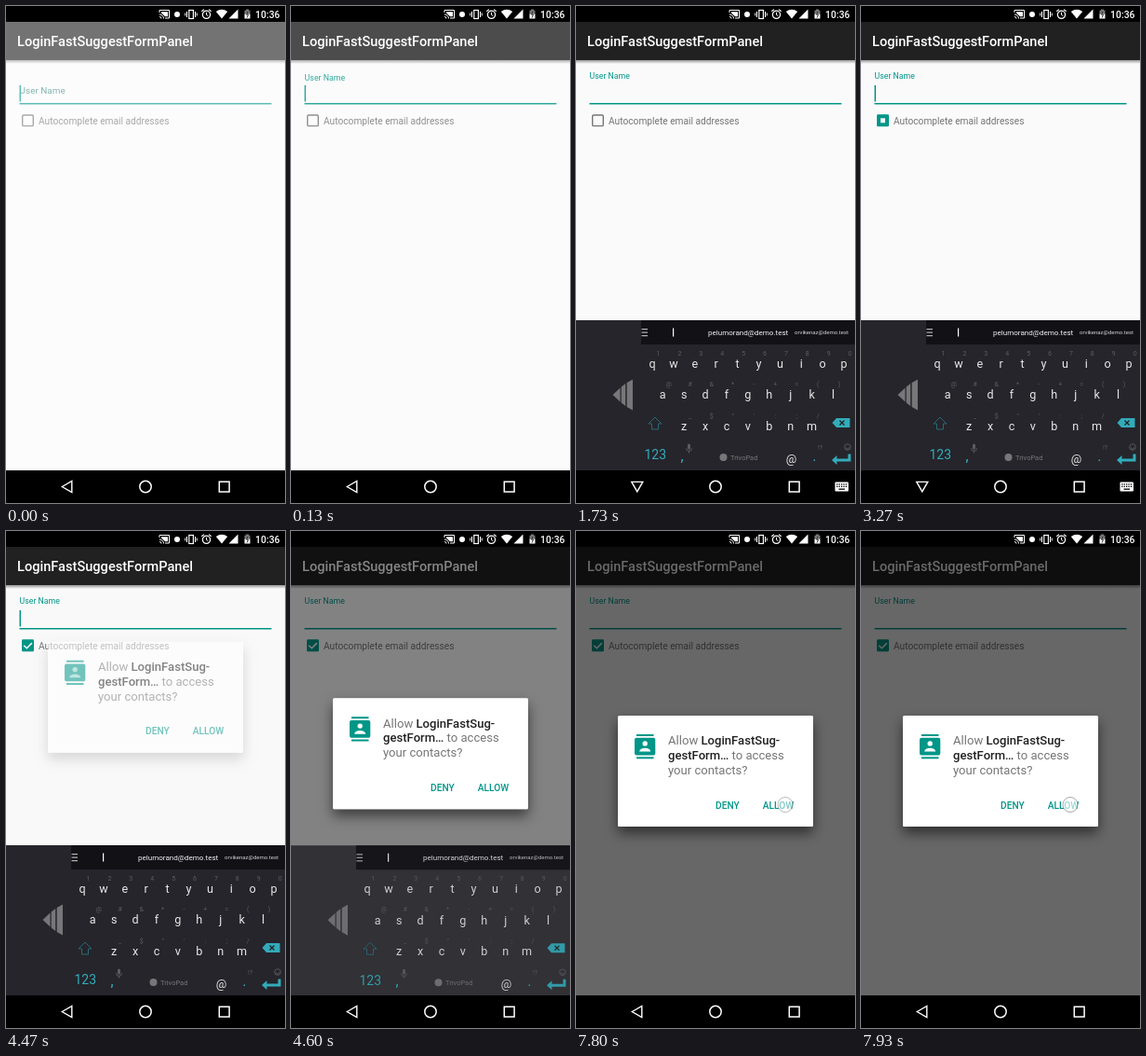
An HTML page with a canvas that plays this animation: 300 px wide and 533 px high, repeating every 8 s.

```html
<!DOCTYPE html>
<html lang="en">
<head>
<meta charset="utf-8">
<style>
html, body { margin: 0; width: 100%; height: 100%; overflow: hidden; background: #000; }
canvas { display: block; width: 300px; height: 533px; }
</style>
</head>
<body>
<canvas id="stage"></canvas>
<script>
const W = 300, H = 533, LOOP = 8000;
const PAPER = '#fafafa', DARK = '#212121', ACCENT = '#009688', WHITE = '#fff', MUTED = '#757575';
const KEY_BG = '#25252b', KEY_INK = '#e8e8ea', KEY_TEAL = '#33abba', KEY_DIM = '#5c5c64';
const APP_NAME = 'LoginFastSuggestFormPanel';

const canvas = document.getElementById('stage');
const ctx = canvas.getContext('2d');
const ratio = window.devicePixelRatio || 1;
canvas.width = W * ratio;
canvas.height = H * ratio;

const clamp = v => Math.min(1, Math.max(0, v));
const span = (t, from, to) => clamp((t - from) / (to - from));
const mix = (a, b, p) => a + (b - a) * p;
const easeOut = p => 1 - (1 - p) ** 3;
const between = (t, from, to) => t >= from && t < to;

function rect(x, y, w, h, color) {
  ctx.fillStyle = color;
  ctx.fillRect(x, y, w, h);
}

function roundRect(x, y, w, h, r, color) {
  ctx.beginPath();
  ctx.roundRect(x, y, w, h, r);
  ctx.fillStyle = color;
  ctx.fill();
}

function text(str, x, y, size, color, weight = 400, align = 'left') {
  ctx.font = `${weight} ${size}px Roboto, sans-serif`;
  ctx.textAlign = align;
  ctx.fillStyle = color;
  ctx.fillText(str, x, y);
  return x + ctx.measureText(str).width;
}

function trace(points, closed) {
  ctx.beginPath();
  points.forEach(([x, y]) => ctx.lineTo(x, y));
  if (closed) ctx.closePath();
}

function poly(points, color) {
  trace(points, true);
  ctx.fillStyle = color;
  ctx.fill();
}

function stroke(color, width) {
  ctx.strokeStyle = color;
  ctx.lineWidth = width;
  ctx.stroke();
}

function line(points, color, width, closed = false) {
  trace(points, closed);
  stroke(color, width);
}

function circle(x, y, r, from = 0, to = Math.PI * 2) {
  ctx.beginPath();
  ctx.arc(x, y, r, from, to);
}

function disc(x, y, r, color) {
  circle(x, y, r);
  ctx.fillStyle = color;
  ctx.fill();
}

// Runs draw with its own opacity and offset.
function layer(alpha, dy, draw) {
  ctx.save();
  ctx.globalAlpha *= alpha;
  ctx.translate(0, dy);
  draw();
  ctx.restore();
}

function drawStatusBar() {
  rect(0, 0, W, 17, '#000');
  line([[165, 7], [165, 4.5], [175.5, 4.5], [175.5, 13], [171, 13]], WHITE, 1);
  for (const r of [2, 4.5]) {
    circle(165, 13.5, r, -Math.PI / 2, 0);
    stroke(WHITE, 1);
  }
  poly([[167, 6.3], [174, 6.3], [174, 11.3], [171, 11.3], [167, 7.5]], WHITE);
  disc(184, 9, 3, WHITE);

  ctx.strokeStyle = WHITE;
  ctx.lineWidth = 1.2;
  ctx.strokeRect(196.8, 4.5, 4.6, 9);
  for (const [x, y, h] of [[194, 6, 6], [192.3, 7.5, 3], [203, 6, 6], [204.7, 7.5, 3]]) rect(x, y, 1, h, WHITE);

  circle(215.5, 9.3, 4.1);
  stroke(WHITE, 1.3);
  line([[215.5, 6.8], [215.5, 9.5], [217.3, 10.6]], WHITE, 1);
  line([[210.3, 5.8], [213, 3.6]], WHITE, 1.2);
  line([[218, 3.6], [220.7, 5.8]], WHITE, 1.2);

  ctx.beginPath();
  ctx.moveTo(232, 13.6);
  ctx.lineTo(225.8, 6);
  ctx.quadraticCurveTo(232, 1.6, 238.2, 6);
  ctx.fillStyle = WHITE;
  ctx.fill();
  poly([[239.5, 13.5], [249.5, 13.5], [249.5, 3.5]], WHITE);

  rect(258, 3.5, 3, 1.5, '#777');
  rect(256.5, 4.7, 6, 3.8, '#777');
  rect(256.5, 8.5, 6, 5, WHITE);
  line([[260, 6], [258.6, 9.3], [260.6, 9.3], [259, 12.5]], '#222', 0.9);
  text('10:36', 294.5, 12.7, 10.4, WHITE, 500, 'right');
}

function drawNavBar(t) {
  rect(0, 498, W, 35, '#000');
  const keyboardOpen = between(t, 1130, 4330);
  line(keyboardOpen
    ? [[59.8, 510.4], [71.8, 510.4], [65.8, 520.8]]
    : [[60.3, 515.5], [70.8, 509.4], [70.8, 521.6]], WHITE, 1.4, true);
  circle(150, 515.5, 6.2);
  stroke(WHITE, 1.5);
  ctx.strokeRect(229.3, 510.2, 10.8, 10.8);
  if (!keyboardOpen) return;
  roundRect(278.5, 510.5, 14.5, 10, 1, WHITE);
  for (let row = 0; row < 2; row++)
    for (let col = 0; col < 5; col++) rect(280.2 + col * 2.4, 512.3 + row * 2.4, 1.3, 1.3, '#000');
  rect(282.5, 517.5, 6.5, 1.3, '#000');
}

function drawCheckbox(t) {
  const fill = span(t, 3170, 3290);
  const mark = span(t, 3300, 3450);
  const ripple = span(t, 2600, 2950) * (1 - span(t, 3100, 3260));
  if (ripple > 0) layer(0.12 * ripple, 0, () => disc(23.5, 123, mix(8, 20, span(t, 2600, 2950)), '#000'));

  if (fill === 0) {
    ctx.beginPath();
    ctx.roundRect(17.7, 117, 11.6, 11.6, 1.2);
    stroke(MUTED, 1.4);
    return;
  }
  roundRect(17, 116.3, 13, 13, 1.3, ACCENT);
  const hole = mix(10, 4, fill) * (1 - span(t, 3290, 3340));
  rect(23.5 - hole / 2, 122.8 - hole / 2, hole, hole, PAPER);
  if (mark > 0) {
    const at = (x, y) => [mix(22.3, x, mark), mix(125.6, y, mark)];
    line([at(19.2, 122.8), [22.3, 125.8], at(27.9, 120.1)], PAPER, 1.5);
  }
}

function caretVisible(t) {
  return t < 530 || between(t, 1070, 1530) || between(t, 2000, 2470) ||
    between(t, 3000, 3470) || between(t, 3870, 4530);
}

function drawForm(t) {
  rect(0, 17, W, 481, PAPER);
  const shade = ctx.createLinearGradient(0, 58, 0, 62);
  shade.addColorStop(0, 'rgba(0,0,0,.4)');
  shade.addColorStop(1, 'rgba(0,0,0,0)');
  rect(0, 58, W, 4, shade);
  rect(0, 17, W, 41, DARK);
  text(APP_NAME, 12, 43.4, 14.6, WHITE, 500);

  const float = easeOut(span(t, 0, 230));
  text('User Name', 14.6, mix(94.6, 78.2, float), mix(9.95, 8.75, float), float < 0.5 ? '#3b8a80' : ACCENT);
  rect(14.5, 104, 271, 1.5, ACCENT);
  if (caretVisible(t)) rect(14.5, 85, 1.5, 17.5, ACCENT);
  drawCheckbox(t);
  text('Autocomplete email addresses', 35, 126.6, 10.2, MUTED);

  layer(0.37 * (1 - span(t, 0, 270)), 0, () => rect(0, 17, W, 481, WHITE));
}

function drawKeyRow(letters, hints, x, y) {
  [...letters].forEach((letter, i) => {
    const cx = x + i * 22.9;
    text(letter, cx, y + 4.3, 12.6, KEY_INK, 400, 'center');
    text(hints[i], cx + 6.5, y - 8.8, 7, KEY_DIM, 400, 'center');
  });
}

function drawKeyboard() {
  rect(0, 337, W, 161, KEY_BG);
  rect(70, 337, 230, 26, '#111116');

  for (const y of [346, 349.5, 353]) rect(70.5, y, 6.5, 1.2, '#b4b4b8');
  rect(104, 345.5, 1.2, 9, WHITE);
  text('pelumorand@demo.test', 142, 352.8, 8.05, '#f2f2f4');
  text('orvikenaz@demo.test', 235, 352, 6, '#d4d4d8');

  const grey = '#77777a';
  poly([[39.5, 417], [47.5, 409.5], [47.5, 424.5]], grey);
  poly([[48.7, 408.5], [53.2, 405], [53.2, 429], [48.7, 425.5]], grey);
  poly([[54.7, 404], [61, 400.5], [61, 433.5], [54.7, 430]], grey);

  drawKeyRow('qwertyuiop', '1234567890', 82, 383.5);
  drawKeyRow('asdfghjkl', '@#&*-+=()', 93.3, 417);
  drawKeyRow('zxcvbnm', '_$"\':;/', 116.2, 450.5);

  line([[85, 441], [92, 448], [88.5, 448], [88.5, 454], [81.5, 454], [81.5, 448], [78, 448]], '#2b6875', 1, true);
  poly([[275.5, 447], [280, 442], [294.5, 442], [294.5, 452], [280, 452]], KEY_TEAL);
  line([[283.5, 444.5], [288.5, 449.5]], DARK, 1.3);
  line([[288.5, 444.5], [283.5, 449.5]], DARK, 1.3);

  text('123', 73.5, 486.3, 14, KEY_TEAL);
  text(',', 112.5, 488, 14, KEY_TEAL, 500);
  roundRect(120, 469.5, 3, 6, 1.5, KEY_DIM);
  line([[118.6, 474], [119.3, 477], [123.7, 477], [124.4, 474]], KEY_DIM, 0.8);
  rect(121, 477, 1, 2.5, KEY_DIM);
  disc(158.5, 484, 4, grey);
  text('TrivoPad', 166, 486.8, 7.5, grey);
  text('@', 231.5, 490, 12.8, KEY_INK, 400, 'center');
  text('.', 254.5, 488, 13, KEY_TEAL, 500);
  text('!?', 260, 476, 7, KEY_DIM);
  circle(292, 473, 3.3);
  stroke(KEY_DIM, 0.9);
  circle(292, 473.3, 1.7, 0, Math.PI);
  stroke(KEY_DIM, 0.8);
  poly([[275, 487], [280.5, 482], [280.5, 485.6], [292.5, 485.6], [292.5, 480.5], [295.5, 480.5],
    [295.5, 488.4], [280.5, 488.4], [280.5, 492]], KEY_TEAL);
}

// The shadow is clipped away under the card so it never shows through while fading.
function drawCardShadow(strength) {
  ctx.save();
  ctx.beginPath();
  ctx.rect(0, -W, W, 3 * W);
  ctx.rect(45, 0, 210, 119);
  ctx.clip('evenodd');
  ctx.shadowColor = `rgba(0,0,0,${strength})`;
  ctx.shadowBlur = 14 * ratio;
  ctx.shadowOffsetY = 7 * ratio;
  roundRect(45, 0, 210, 119, 1.5, WHITE);
  ctx.restore();
}

function drawDialog(shadow) {
  drawCardShadow(shadow);
  roundRect(45, 0, 210, 119, 1.5, WHITE);

  rect(65, 20, 18.5, 2, ACCENT);
  rect(65, 44.3, 18.5, 2, ACCENT);
  roundRect(63, 23.7, 22.3, 18.8, 2, ACCENT);
  disc(74.2, 29.9, 2.7, WHITE);
  ctx.beginPath();
  ctx.ellipse(74.2, 38.6, 6, 3.9, 0, Math.PI, 0);
  ctx.fillStyle = WHITE;
  ctx.fill();

  const size = 13.1;
  const firstEnd = text('Allow ', 99, 31.4, size, MUTED);
  text('LoginFastSug-', firstEnd, 31.4, size, DARK, 500);
  const secondEnd = text('gestForm…', 99, 47.2, size, DARK, 500);
  text(' to access', secondEnd, 47.2, size, MUTED);
  text('your contacts?', 99, 63, size, MUTED);
  text('DENY', 150, 99.7, 10.2, ACCENT, 500);
  text('ALLOW', 200.8, 99.7, 10.2, ACCENT, 500);
}

function drawTouch(x, y, alpha) {
  layer(alpha, 0, () => {
    disc(x, y, 8, 'rgba(255,255,255,.62)');
    circle(x, y, 8);
    stroke('rgba(110,110,110,.6)', 1);
  });
}

function draw(t) {
  ctx.setTransform(ratio, 0, 0, ratio, 0, 0);
  drawForm(t);

  const dim = 0.59 * span(t, 4470, 4630);
  if (dim > 0) layer(dim, 0, () => rect(0, 17, W, 481, '#000'));

  const shown = easeOut(span(t, 1070, 1400));
  const hidden = span(t, 4560, 4850);
  if (shown > 0 && hidden < 1) {
    ctx.save();
    ctx.beginPath();
    ctx.rect(0, 17, W, 481);
    ctx.clip();
    layer(shown * (1 - hidden), (1 - shown) * 80 + hidden ** 3 * 80, drawKeyboard);
    ctx.restore();
  }

  if (t >= 4470) {
    const arrive = span(t, 4470, 4590);
    layer(mix(0.55, 1, arrive), mix(118, 198, easeOut(span(t, 4470, 4812))),
      () => drawDialog(mix(0.25, 0.55, arrive)));
  }
  if (between(t, 2800, 3130)) drawTouch(26, 124, 0.8);
  if (t >= 7800) drawTouch(225, 293.5, t < 7930 ? 0.8 : 1);

  drawStatusBar();
  drawNavBar(t);
}

function frame() {
  draw(performance.now() % LOOP);
  requestAnimationFrame(frame);
}
frame();
</script>
</body>
</html>
```
